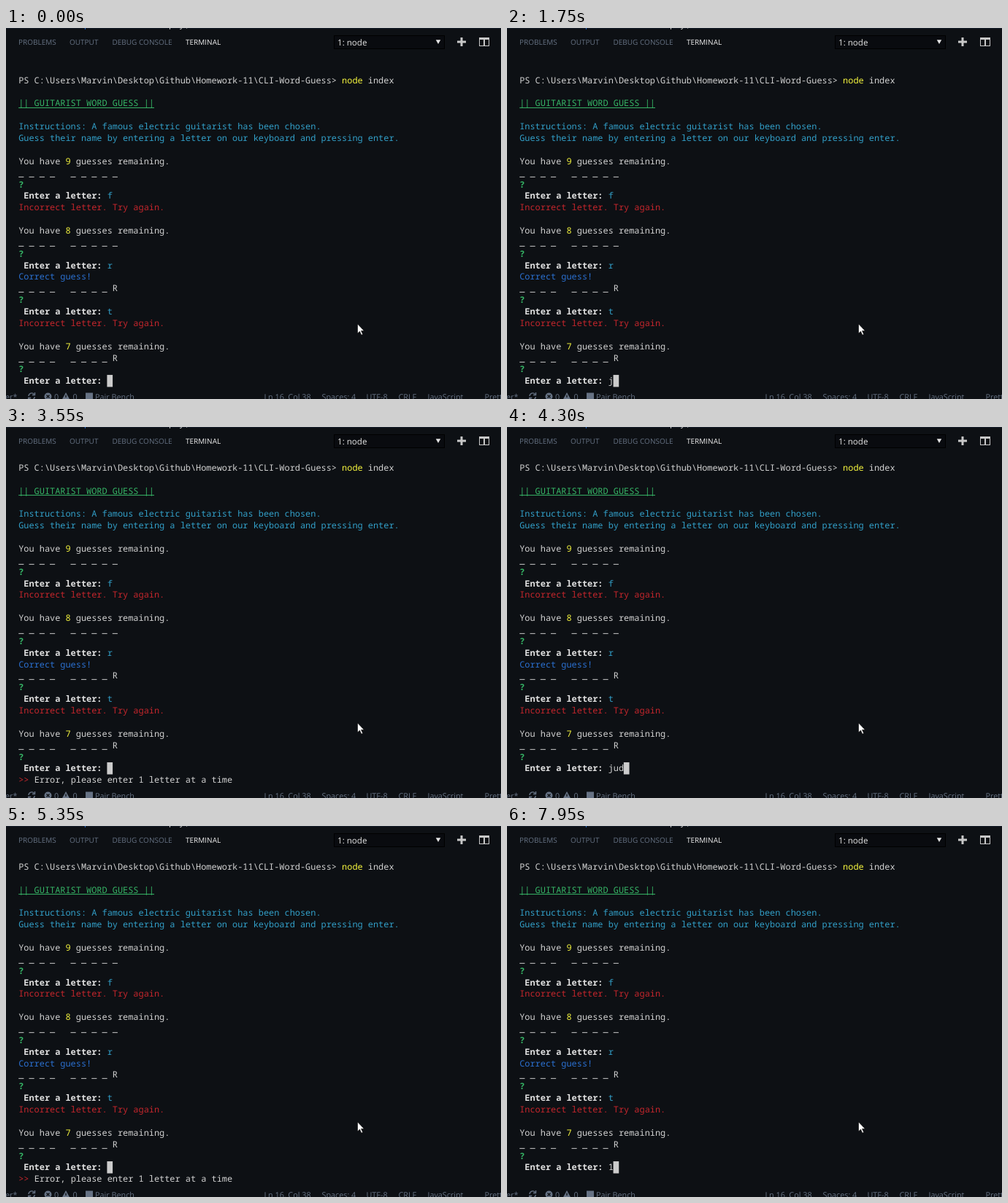
Write an HTML page that moves like this. It is 678x509 px and loops after 8 s.

```html
<!DOCTYPE html>
<html lang="en">
<head>
<meta charset="utf-8">
<title>Word guess terminal</title>
<style>
  html, body { margin: 0; width: 100%; height: 100%; overflow: hidden; background: #0d1014; }
  svg { display: block; width: 678px; height: 509px; }
  text { white-space: pre; text-rendering: geometricPrecision; }
  .ui { font-family: "Open Sans", "Noto Sans", sans-serif; }
  .tab { font-size: 10px; fill: #667284; }
  .status { font-size: 10.8px; fill: #667284; }
  .term { font: 500 11.911px "Noto Sans Mono", "DejaVu Sans Mono", monospace; fill: #d2d2d2; }
  .bold { font-weight: 700; fill: #e2e2e2; }
  .green { fill: #36b566; }
  .mark { fill: #36b566; font-weight: 700; }
  .cyan { fill: #329fc8; }
  .blue { fill: #2b70d0; }
  .red { fill: #c4262c; }
  .yellow { fill: #f5f53e; }
</style>
</head>
<body>
<svg viewBox="0 0 678 509">
  <rect width="678" height="509" fill="#0d1014"/>
  <rect width="678" height="1" fill="#141c28"/>
  <g id="editor" class="term"></g>

  <g id="tabs" class="ui tab"></g>
  <rect x="449.500" y="10.500" width="151" height="18" fill="#090b0f" stroke="#000"/>
  <text class="ui" x="454" y="23.5" font-size="11.6" fill="#e4e4e4">1: node</text>
  <path d="M588.800 16.300h6.400l-3.200 5.700z" fill="#e4e4e4"/>
  <path d="M618 19h12M624 13v12" stroke="#c8c8c8" stroke-width="3"/>
  <path d="M648 13h14v12h-14zM649 16h5v8h-5zM656 16h5v8h-5z" fill="#c8c8c8" fill-rule="evenodd"/>

  <g id="screen" class="term"></g>
  <rect id="caret" width="7.700" height="16.500" fill="#cccccc"/>

  <g id="status" class="ui status"></g>
  <g fill="none" stroke="#667284" stroke-width="1.400">
    <path d="M31 505a4.200 4.200 0 0 1 7.500-2.500M39.200 506a4.200 4.200 0 0 1-7.500 2.500"/>
    <path d="M39.500 500v3.500h-3.500M30.700 511v-3.500h3.500"/>
  </g>
  <circle cx="57.500" cy="505.500" r="5" fill="#667284"/>
  <path d="M55.500 503.500l4 4m0-4l-4 4" stroke="#0d1014" stroke-width="1.300"/>
  <path d="M82 500l5.500 10h-11z" fill="#667284"/>
  <path d="M82 503.500v3.500" stroke="#0d1014" stroke-width="1.300"/>
  <rect x="109" y="500.500" width="10" height="10" fill="#667284"/>

  <path d="M481.500 406v13l3-2.800 2.200 5 2-.9-2.200-4.800h4z" fill="#fff" stroke="#000" stroke-width=".6"/>
</svg>
<script>
const NS = "http://www.w3.org/2000/svg";
const LOOP = 8000, LEFT = 17.2, TOP = 75.7, COL = 7.147, ROW = 15.87;
const INPUT_ROW = 26, INPUT_COL = 17;
const byId = id => document.getElementById(id);

function add(parent, tag, attrs = {}, text = "") {
  const el = document.createElementNS(NS, tag);
  for (const key in attrs) el.setAttribute(key, attrs[key]);
  el.textContent = text;
  return parent.appendChild(el);
}

const baseline = row => TOP + row * ROW;

// A line is a list of [text, class] runs.
function addLine(row, runs) {
  const line = add(byId("screen"), "text", { x: LEFT, y: baseline(row) });
  for (const [text, cls = ""] of runs) add(line, "tspan", { class: cls }, text);
  return line;
}

const remaining = n => [["You have "], [n, "yellow"], [" guesses remaining."]];
const ask = letter => [[" Enter a letter: ", "bold"], [letter, "cyan"]];
const mark = [["?", "mark"]];
const wrong = [["Incorrect letter. Try again.", "red"]];
const hidden = [["_ _ _ _   _ _ _ _ _"]];
const partial = [["_ _ _ _   _ _ _ _ R"]];
const title = "|| GUITARIST WORD GUESS ||";

const lines = [
  [["PS C:\\Users\\Marvin\\Desktop\\Github\\Homework-11\\CLI-Word-Guess> "], ["node", "yellow"], [" index"]],
  [],
  [[title, "green"]],
  [],
  [["Instructions: A famous electric guitarist has been chosen.", "cyan"]],
  [["Guess their name by entering a letter on our keyboard and pressing enter.", "cyan"]],
  [],
  remaining(9), hidden, mark, ask("f"), wrong,
  [],
  remaining(8), hidden, mark, ask("r"), [["Correct guess!", "blue"]],
  partial, mark, ask("t"), wrong,
  [],
  remaining(7), partial, mark, ask("")
];
lines.forEach((runs, row) => addLine(row, runs));
add(byId("screen"), "rect", {
  x: LEFT, y: baseline(2) + 1.5, width: title.length * COL, height: 1, class: "green"
});
const typed = add(byId("screen"), "text", { x: LEFT + INPUT_COL * COL, y: baseline(INPUT_ROW) });
const error = addLine(INPUT_ROW + 1, [[">>", "red"], [" Error, please enter 1 letter at a time"]]);

// Only the descenders of the editor's last line reach into view.
add(byId("editor"), "text", { x: 107, y: -1, class: "blue" }, "p");
add(byId("editor"), "text", { x: 223, y: -1 }, "p.y;");

for (const [x, label] of [[17, "PROBLEMS"], [87, "OUTPUT"], [145.5, "DEBUG CONSOLE"]])
  add(byId("tabs"), "text", { x, y: 23 }, label);
add(byId("tabs"), "text", { x: 246, y: 23, fill: "#f0f0f0", "font-weight": 500 }, "TERMINAL");

for (const [x, label] of [[-1, "er*"], [66, "0"], [91.5, "0"], [122, "Pair Bench"],
  [353.5, "Ln 16, Col 38"], [432.5, "Spaces: 4"], [493.5, "UTF-8"], [537.5, "CRLF"],
  [577.5, "JavaScript"], [655.5, "Prettier"]])
  add(byId("status"), "text", { x, y: 510 }, label);

// Each attempt: the text, its key times, and when Enter is pressed.
const attempts = [
  { text: "ju", keys: [1500, 2250], enter: 2700 },
  { text: "jude wiler", keys: [3850, 4050, 4300, 4500, 4650, 4750, 4850, 4950, 5050, 5150], enter: 5300 },
  { text: "1", keys: [6900], enter: Infinity }
];

function draw(t) {
  let input = "", failed = false;
  for (const { text, keys, enter } of attempts) {
    if (t < keys[0]) break;
    failed = t >= enter;
    input = failed ? "" : text.slice(0, keys.filter(k => t >= k).length);
  }
  const shift = t >= attempts[0].enter ? -ROW : 0;
  byId("screen").setAttribute("transform", `translate(0 ${shift})`);
  typed.textContent = input;
  error.setAttribute("visibility", failed ? "visible" : "hidden");
  byId("caret").setAttribute("x", LEFT + (INPUT_COL + input.length) * COL - 0.3);
  byId("caret").setAttribute("y", baseline(INPUT_ROW) - 12.4 + shift);
}

const start = performance.now();
function frame() {
  draw((performance.now() - start) % LOOP);
  requestAnimationFrame(frame);
}
frame();
</script>
</body>
</html>
```
